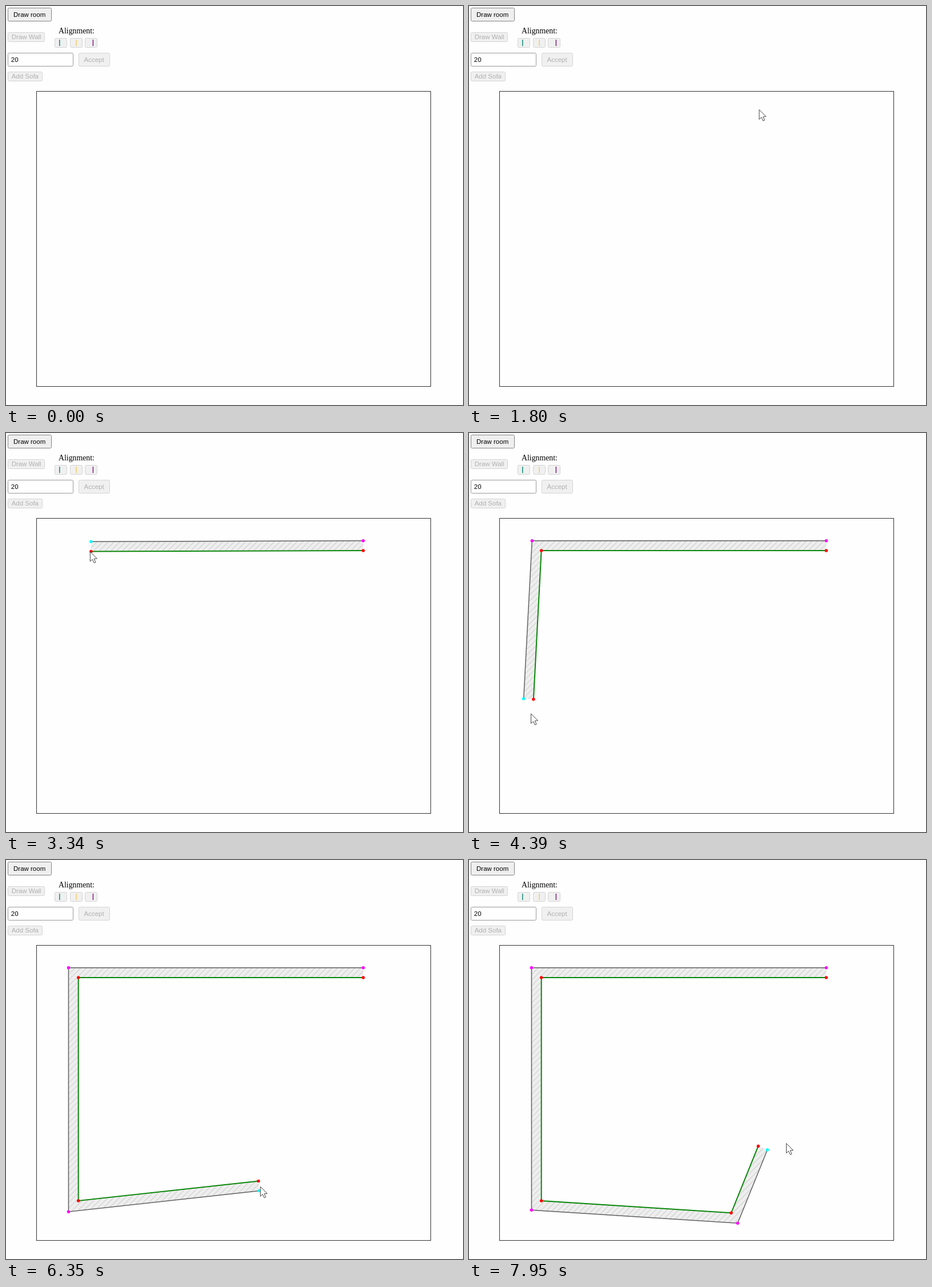
These frames come from a looping animation (800x699 px, 8000 ms). An HTML page with a canvas:

```html
<!DOCTYPE html>
<html lang="en">
<head>
<meta charset="utf-8">
<title>Room editor</title>
<style>
html, body { margin: 0; width: 100%; height: 100%; overflow: hidden; background: #fefefe; }
canvas { display: block; }
</style>
</head>
<body>
<canvas id="stage" width="800" height="699"></canvas>
<script>
const ctx = document.getElementById('stage').getContext('2d');
const LOOP = 8000, ENTER = 70, THICKNESS = 17.25, LAG = 60, HATCH_GAP = 10;
const SANS = '11.5px "Liberation Sans", Arial, sans-serif';
const SERIF = '13.8px "Liberation Serif", "Times New Roman", serif';

const linear = p => p;
const easeOut = p => 1 - (1 - p) ** 2;

// The pointer's journey: moves, pauses and the clicks that fix wall corners.
const stops = [], corners = [];
const move = (time, x, y, ease = linear) => stops.push({ time, x, y, ease });
const pause = time => stops.push({ ...stops[stops.length - 1], time });
function click(time) {
  pause(time);
  const { x, y } = stops[stops.length - 1];
  corners.push({ time, point: [x, y] });
}

move(ENTER, 536, 665);
move(240, 540, 585);
move(830, 185, 92);
move(1100, 45, 14, easeOut);
pause(1660);
move(1800, 507, 181);
move(2250, 625.4, 206, easeOut);
click(2400);
move(3340, 147, 207.5, easeOut);
move(3480, 126.7, 206);
click(3650);
move(4330, 113, 466);
move(4390, 108, 491);
move(5100, 126.7, 597, easeOut);
click(5180);
move(5790, 396, 614, easeOut);
move(6250, 440, 556);
move(6650, 459, 618.3);
click(6911);
move(7120, 606, 603);
move(7890, 505.5, 501.3, easeOut);
move(7950, 555, 496);

function pointerAt(t) {
  const next = stops.findIndex(stop => stop.time > t);
  if (next < 1) {
    const edge = next ? stops[stops.length - 1] : stops[0];
    return [edge.x, edge.y];
  }
  const a = stops[next - 1], b = stops[next];
  const k = b.ease((t - a.time) / (b.time - a.time));
  return [a.x + (b.x - a.x) * k, a.y + (b.y - a.y) * k];
}

function box(x, y, w, h, fill, border) {
  ctx.beginPath();
  ctx.roundRect(x + .5, y + .5, w - 1, h - 1, 2);
  ctx.fillStyle = fill;
  ctx.fill();
  ctx.lineWidth = 1;
  ctx.strokeStyle = border;
  ctx.stroke();
}

function label(text, x, y, color, font = SANS) {
  ctx.font = font;
  ctx.fillStyle = color;
  ctx.fillText(text, x, y);
}

function disabledButton(text, x, y, w, h, pad = 6.7) {
  box(x, y, w, h, '#f0f0f0', '#d4d4d4');
  label(text, x + pad, y + h / 2 + 3.8, '#b0b0b0');
}

function drawControls(hover) {
  box(3, 3, 77, 24, hover ? '#e5e5e5' : '#efefef', hover ? '#4f4f4f' : '#858585');
  label('Draw room', 13, 19, '#000');
  disabledButton('Draw Wall', 3, 46, 65, 17);
  label('Alignment:', 92, 48, '#000', SERIF);
  ['#199080', '#f1cf70', '#8a248a'].forEach((color, i) => {
    disabledButton('', 85 + Math.round(26.5 * i), 56, 22, 17);
    ctx.fillStyle = color;
    ctx.fillRect(93 + 29.3 * i, 59, 1.6, 11);
  });
  box(3, 82, 115, 24, '#fff', '#999');
  label('20', 8.8, 98, '#000');
  disabledButton('Accept', 127, 82, 55, 24, 9.5);
  disabledButton('Add Sofa', 3, 115, 61, 17);
  ctx.strokeStyle = '#333';
  ctx.strokeRect(53.5, 149.5, 690, 517);
}

// Offsets the inner outline to one side, with mitred corners.
function offsetLine(points) {
  const normals = points.slice(1).map(([x, y], i) => {
    const dx = x - points[i][0], dy = y - points[i][1], len = Math.hypot(dx, dy);
    return [-dy / len, dx / len];
  });
  return points.map(([x, y], i) => {
    const a = normals[Math.max(i - 1, 0)], b = normals[Math.min(i, normals.length - 1)];
    const k = THICKNESS / (1 + a[0] * b[0] + a[1] * b[1]);
    return [x + (a[0] + b[0]) * k, y + (a[1] + b[1]) * k];
  });
}

function trace(points) {
  ctx.beginPath();
  points.forEach(p => ctx.lineTo(...p));
}

function strokeLine(points, color, width) {
  trace(points);
  ctx.strokeStyle = color;
  ctx.lineWidth = width;
  ctx.stroke();
}

function dot([x, y], color) {
  ctx.beginPath();
  ctx.arc(x, y, 2.7, 0, Math.PI * 2);
  ctx.fillStyle = color;
  ctx.fill();
}

function fillHatched(outline) {
  ctx.save();
  trace(outline);
  ctx.fillStyle = '#eee';
  ctx.fill();
  ctx.clip();
  ctx.beginPath();
  for (let x = 0; x < 1500; x += HATCH_GAP) {
    ctx.moveTo(x, 0);
    ctx.lineTo(x - 699, 699);
  }
  ctx.strokeStyle = '#d0d0d0';
  ctx.lineWidth = 1.2;
  ctx.stroke();
  ctx.restore();
}

function drawWalls(t) {
  const inner = corners.filter(corner => corner.time <= t).map(corner => corner.point);
  if (!inner.length) return;
  const tip = pointerAt(t), last = inner[inner.length - 1];
  if (Math.hypot(tip[0] - last[0], tip[1] - last[1]) > 3) inner.push(tip);
  if (inner.length > 1) {
    const outer = offsetLine(inner);
    fillHatched([...inner, ...outer.slice().reverse()]);
    strokeLine(outer, '#606060', 1.5);
    strokeLine(inner, '#0a870a', 2);
    outer.forEach((p, i) => dot(p, i === outer.length - 1 ? '#0ff' : '#f0f'));
  }
  inner.forEach(p => dot(p, '#f00'));
}

function drawPointer([x, y]) {
  ctx.save();
  ctx.translate(x + .5, y + .5);
  trace([[0, 0], [0, 17], [4, 13.4], [6.8, 19.6], [9.5, 18.4], [6.8, 12.4], [12, 12]]);
  ctx.closePath();
  ctx.fillStyle = '#fff';
  ctx.fill();
  ctx.strokeStyle = '#444';
  ctx.lineWidth = 1;
  ctx.stroke();
  ctx.restore();
}

function render(t) {
  const pointer = pointerAt(t);
  ctx.fillStyle = '#fefefe';
  ctx.fillRect(0, 0, 800, 699);
  drawControls(pointer[0] < 80 && pointer[1] < 27);
  drawWalls(t - LAG);
  if (t >= ENTER) drawPointer(pointer);
}

const start = performance.now();
function tick() {
  render((performance.now() - start) % LOOP);
  requestAnimationFrame(tick);
}
tick();
</script>
</body>
</html>
```
